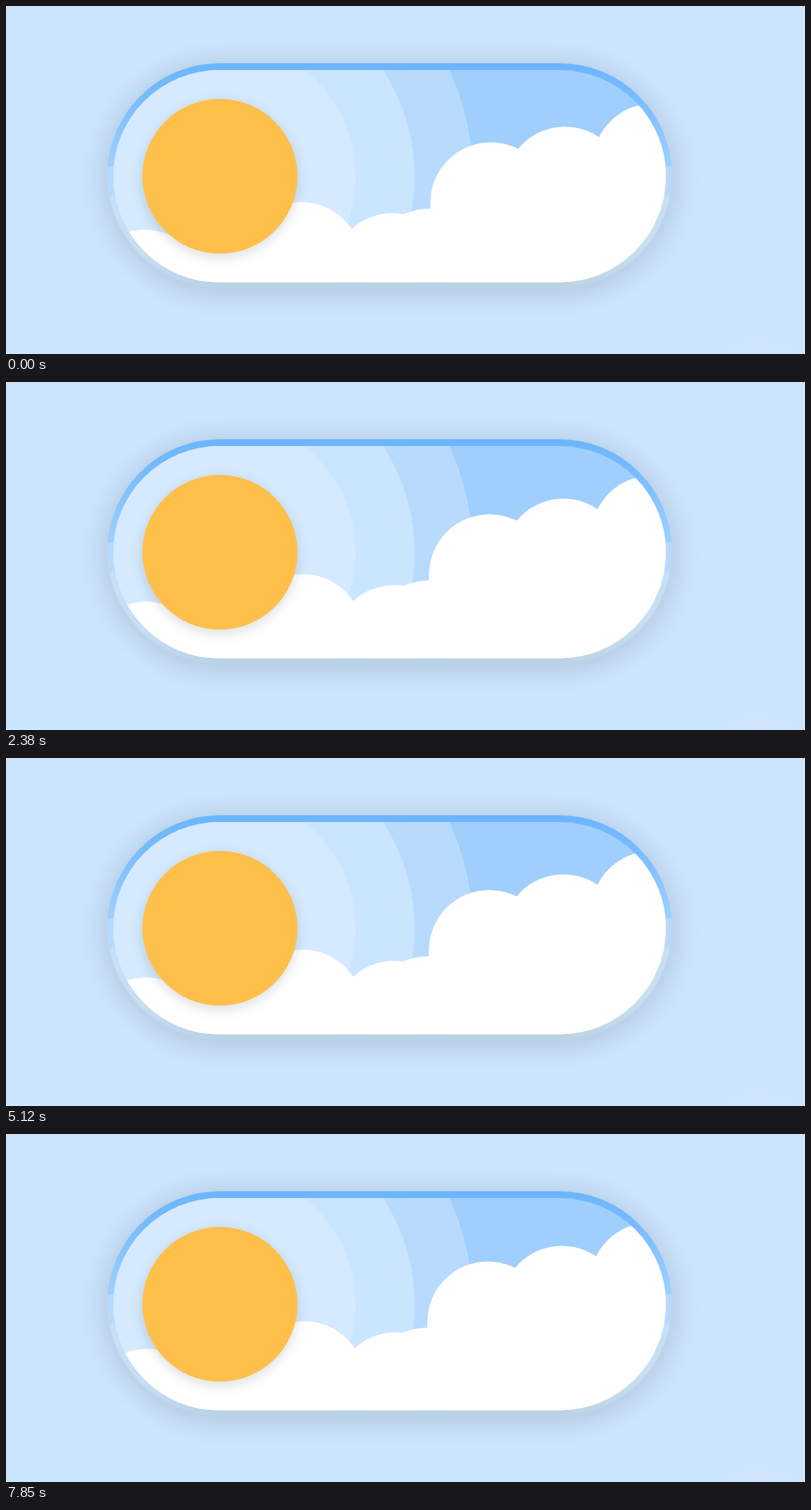
Animation, 1058 px wide and 462 px high, one loop 7870 ms. Source, as an HTML page:

```html
<!DOCTYPE html>
<html lang="en">
<head>
<meta charset="utf-8">
<title>Day toggle</title>
<style>
  html, body { margin: 0; height: 100%; overflow: hidden; background: #cce6fe; }
  svg { display: block; width: 100%; height: 100%; }
</style>
</head>
<body>
<svg viewBox="0 0 1058 462">
  <defs>
    <linearGradient id="rim" x1="0" y1="0" x2="0" y2="1">
      <stop offset="0" stop-color="#6bb5ff"/>
      <stop offset=".15" stop-color="#78bcff"/>
      <stop offset=".46" stop-color="#a0cffe"/>
      <stop offset=".46" stop-color="#b5d9fd"/>
      <stop offset=".58" stop-color="#b9d9f9"/>
      <stop offset=".6" stop-color="#c6def8"/>
      <stop offset=".85" stop-color="#c9def1"/>
      <stop offset="1" stop-color="#bad3e6"/>
    </linearGradient>
    <radialGradient id="glow">
      <stop offset="0" stop-color="#d3e3fe"/>
      <stop offset="1" stop-color="#d3e3fe" stop-opacity="0"/>
    </radialGradient>
    <filter id="pillShadow" x="-20%" y="-40%" width="140%" height="180%" color-interpolation-filters="sRGB">
      <feDropShadow dx="0" dy="4" stdDeviation="20" flood-color="#000" flood-opacity=".17"/>
    </filter>
    <filter id="sunShadow" x="-20%" y="-20%" width="140%" height="140%" color-interpolation-filters="sRGB">
      <feDropShadow dx="0" dy="5" stdDeviation="8" flood-color="#000" flood-opacity=".13"/>
    </filter>
    <clipPath id="window"><rect x="142" y="85" width="732" height="282" rx="141"/></clipPath>
  </defs>

  <rect width="1058" height="462" fill="#cce6fe"/>
  <rect width="1058" height="1.5" fill="#d6dfe5"/>
  <ellipse cx="1000" cy="462" rx="50" ry="24" fill="url(#glow)"/>
  <rect x="134" y="76" width="748" height="298" rx="149" fill="url(#rim)" filter="url(#pillShadow)"/>

  <g clip-path="url(#window)">
    <rect x="142" y="85" width="732" height="282" fill="#a0cffd"/>
    <circle cx="283" cy="226" r="335" fill="#b8dbfd"/>
    <circle cx="283" cy="226" r="258" fill="#cae5fe"/>
    <circle cx="283" cy="226" r="180" fill="#d5eafe"/>
    <g id="leftClouds" fill="#fff"></g>
    <g id="rightClouds" fill="#fff"></g>
    <circle cx="283.3" cy="226" r="102.7" fill="#febf4b" filter="url(#sunShadow)"/>
  </g>
</svg>

<script>
  const LOOP = 7870, RISE = 26.7, DRIFT = 8.9, RADIUS = 80;

  // Each puff is a round-topped column, given by the centre of its top arc.
  function addPuffs(id, centres) {
    const group = document.getElementById(id);
    group.innerHTML = centres.map(([x, y]) =>
      `<rect x="${x - RADIUS}" y="${y - RADIUS}" width="${2 * RADIUS}" height="500" rx="${RADIUS}"/>`).join('');
    return group;
  }

  const left = addPuffs('leftClouds', [[183, 377], [287, 345], [391, 340.3], [512, 355]]);
  const right = addPuffs('rightClouds', [[560.5, 349], [642, 261], [740, 240.2], [857, 209.5]]);

  // [ms, number of half swings]; the swing briefly holds twice late in the loop.
  const pace = [[0, 0], [1600, 1.14], [3160, 2.265], [4310, 3.07], [5120, 3.69], [5530, 3.97],
    [5630, 3.97], [6340, 4.39], [6440, 4.39], [6480, 4.416], [7850, 5.537], [LOOP, 5.55]];

  function swingAt(time) {
    const next = pace.findIndex(([ms]) => ms > time);
    const [t0, s0] = pace[next - 1], [t1, s1] = pace[next];
    return s0 + (s1 - s0) * (time - t0) / (t1 - t0);
  }

  function draw(now) {
    const lift = (1 - Math.cos(Math.PI * swingAt(now % LOOP))) / 2;
    left.setAttribute('transform', `translate(${DRIFT * lift} ${-RISE * lift})`);
    right.setAttribute('transform', `translate(${-DRIFT * lift} ${-RISE * lift})`);
  }

  const start = performance.now();
  function tick() {
    draw(performance.now() - start);
    requestAnimationFrame(tick);
  }
  tick();
</script>
</body>
</html>
```
